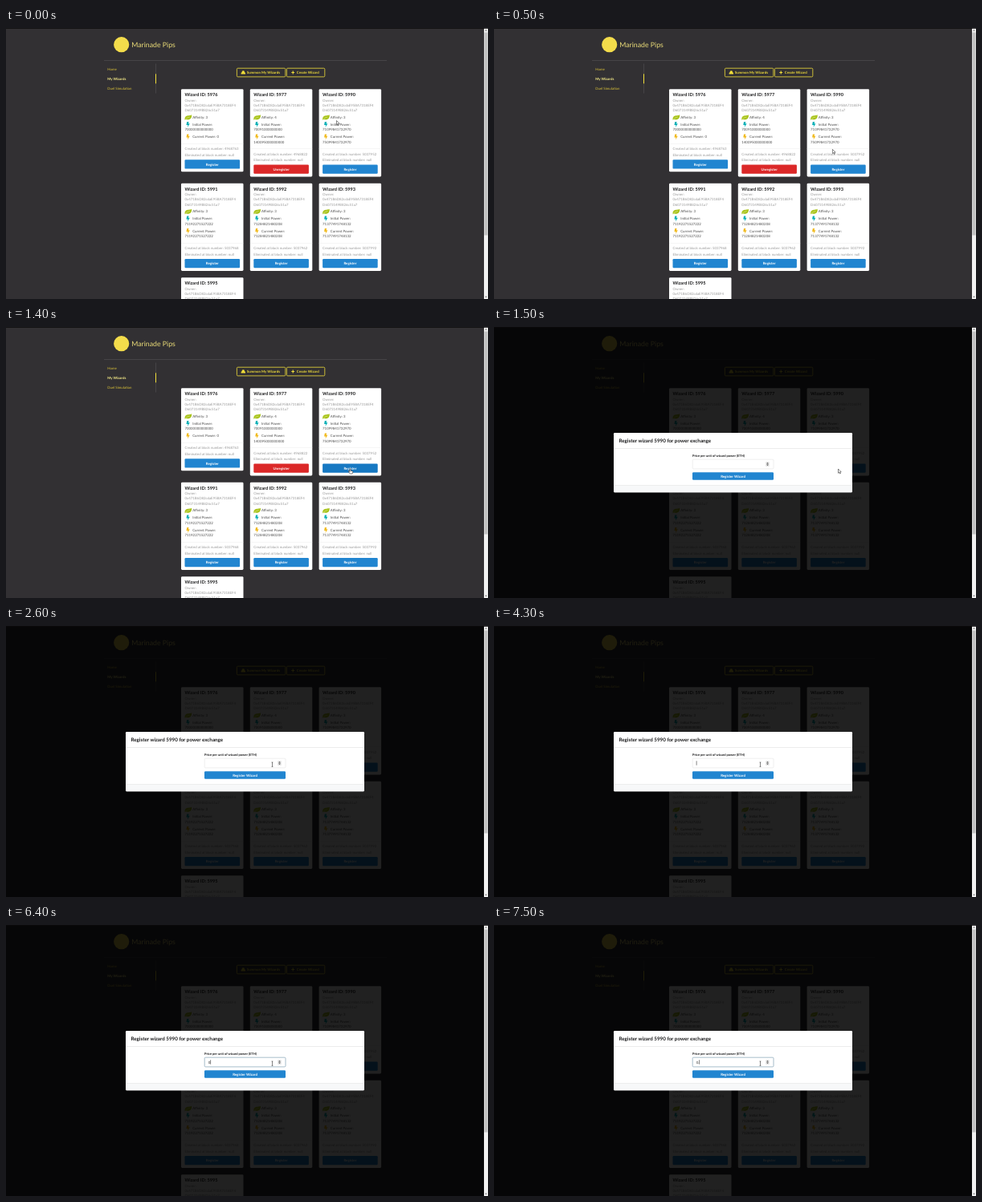
Animation of 600 by 338 pixels, one loop 8 s. Source, as an HTML page:

```html
<!DOCTYPE html>
<html lang="en">
<head>
<meta charset="utf-8">
<title>Wizard registration</title>
<style>
  html, body { margin: 0; height: 100%; overflow: hidden; background: #323033; }
  svg { display: block; width: 100vw; height: 100vh; }
  text { font-family: Lato, sans-serif; text-rendering: geometricPrecision; white-space: pre; }
</style>
</head>
<body>
<svg id="stage" viewBox="0 0 600 338"></svg>
<script>
const LOOP = 8000, STEP = 100;
const BODY = 4.375;
const BLUE = '#2185d0', BLUE_HOVER = '#1678c2', RED = '#db2828', YELLOW = '#f2df3a';
const INK = '#4a4a4a', MUTED = '#999', BLACK = '#1b1b1c';
const OWNER = ['0x471B6D82cdaE95BA7318EF4', 'D6073149B826c51a7'];

const text = (x, y, value, { size = BODY, fill = INK, weight = 400, anchor = 'start' } = {}) =>
  `<text x="${x}" y="${y}" font-size="${size}" fill="${fill}" font-weight="${weight}" text-anchor="${anchor}">${value}</text>`;

const rect = (x, y, w, h, fill, extra = '') =>
  `<rect x="${x}" y="${y}" width="${w}" height="${h}" fill="${fill}" ${extra}/>`;

const path = (d, fill, x = 0, y = 0, extra = '') =>
  `<path d="${d}" fill="${fill}" transform="translate(${x} ${y})" ${extra}/>`;

const button = (x, y, w, h, label, fill, id = '') =>
  rect(x, y, w, h, fill, `rx="1.2" ${id && `id="${id}"`}`) +
  text(x + w / 2, y + h / 2 + 1.55, label, { fill: '#fff', weight: 700, anchor: 'middle' });

const leaf = (x, y) =>
  path('M-4.2 2.6C-4.6-1-2-2.1 .6-2.2 2.4-2.3 3.4-2.7 4.2-3.2 4.9 .6 2.6 2.9-.4 2.8-1.6 2.8-2.4 2.2-3.2 2.7L-4 3.6Z', '#a9c41b', x, y) +
  path('M-3.2 2Q-1 0 2 -.4', 'none', x, y, 'stroke="#e8f0b8" stroke-width=".5"');

const bolt = (x, y, fill) =>
  path('M-1.4-3.4H1L.3-1.2H2.2L-.7 3.6-.1 .5H-2.1Z', fill, x, y);

function card(column, row, { id, affinity, initial, current, block, action = 'Register' }) {
  const x = 218 + column * 85.8, y = 76.2 + row * 117.5, left = x + 4.5;
  const inline = current === '0';
  const shift = inline ? -6.2 : 0;
  const line = (dy, value, style) => text(left, y + dy, value, style);
  const label = (dy, value) => text(x + 14.2, y + dy, value);
  const hoverId = id === 5990 ? 'hovered' : '';
  return rect(x, y, 77.5, 109.3 + shift, '#fff', 'rx="1.4"') +
    line(9.2, `Wizard ID: ${id}`, { size: 5.62, fill: BLACK, weight: 700 }) +
    line(15.3, 'Owner:', { fill: MUTED }) +
    OWNER.map((part, i) => line(21.6 + i * 6.2, part, { fill: MUTED })).join('') +
    leaf(x + 8.8, y + 35.2) + label(36.6, `Affinity: ${affinity}`) +
    bolt(x + 8.6, y + 44.2, '#00aeb5') + label(45.6, 'Initial Power:') + line(51.9, initial) +
    bolt(x + 8.6, y + 59.8, '#f0b91a') + label(61.2, 'Current Power:' + (inline ? ' 0' : '')) +
    (inline ? '' : line(67.7, current)) +
    rect(x, y + 74.4 + shift, 77.5, .35, '#e6e6e6') +
    line(82.3 + shift, `Created at block number: ${block}`, { fill: MUTED }) +
    line(90 + shift, 'Eliminated at block number: null', { fill: MUTED }) +
    button(left, y + 94.3 + shift, 68.6, 11.3, action, action === 'Register' ? BLUE : RED, hoverId);
}

const wizards = [
  { id: 5976, affinity: 3, initial: '70000000000000', current: '0', block: 4968763 },
  { id: 5977, affinity: 4, initial: '70091000000000', current: '140095000000000', block: 4968822, action: 'Unregister' },
  { id: 5990, affinity: 3, initial: '71099841732970', current: '75099841732970', block: 5037952 },
  { id: 5991, affinity: 3, initial: '71192271527222', current: '71192271527222', block: 5037968 },
  { id: 5992, affinity: 3, initial: '71284821480208', current: '71284821480208', block: 5037962 },
  { id: 5993, affinity: 3, initial: '71377491748132', current: '71377491748132', block: 5037992 },
  { id: 5995, affinity: 3, initial: '71562992817304', current: '71562992817304', block: 5038004 },
];

const outlineButton = (x, w, label, textX) =>
  rect(x, 50.2, w, 10.7, 'none', `rx="1.2" stroke="${YELLOW}" stroke-width=".8"`) +
  text(textX, 57.1, label, { fill: YELLOW, weight: 700 });

const header =
  `<circle cx="143.7" cy="20.7" r="9.6" fill="#f3dc4b"/>` +
  text(156.2, 23.6, 'Marinade Pips', { size: 8.75, fill: '#eadb78' }) +
  rect(122, 40.3, 352, .5, '#5a585b');

const sidebar =
  rect(186.3, 44.5, .5, 37, '#5a585b') + rect(186, 57.3, 1, 12, YELLOW) +
  text(126.2, 53.2, 'Home', { fill: '#dcc338' }) +
  text(126.2, 65.2, 'My Wizards', { fill: '#fbf08a', weight: 700 }) +
  text(126.2, 77.1, 'Duel Simulation', { fill: '#dcc338' });

const toolbar =
  outlineButton(287.4, 60.4, 'Summon My Wizards', 299.8) +
  path('M-2.7 1.7V.5Q-2.6-.5-1.4-.4A1.5 1.5 0 1 1 1.4-.4Q2.6-.5 2.7 .5V1.7Z', YELLOW, 295.3, 55.7) +
  outlineButton(349.4, 47.4, 'Create Wizard', 361.8) +
  path('M-1.9 0H1.9M0-1.9V1.9', 'none', 357.2, 55.5, `stroke="${YELLOW}" stroke-width="1.1"`);

const modal =
  rect(149, 132, 297, 74.2, '#fff', 'rx="1.2"') +
  text(155.4, 144, 'Register wizard 5990 for power exchange', { size: 6.25, fill: BLACK, weight: 700 }) +
  rect(149, 151.2, 297, .5, '#d8d8d9') +
  text(247, 162.3, 'Price per unit of wizard power (ETH)', { size: 4.06, fill: BLACK, weight: 700 }) +
  rect(247.2, 165.2, 100.8, 11.7, '#fff', 'rx="1.2" stroke="#dcdcdd" stroke-width=".5"') +
  rect(247.2, 165.2, 100.8, 11.7, 'none', 'id="focus" rx="1.2" stroke="#7fa3ba" stroke-width=".6"') +
  rect(338.3, 168.2, 4.4, 5.7, '#e2e2e2') +
  path('M-1.2-.5L0-2 1.2-.5ZM-1.2 .5L0 2 1.2 .5Z', '#444', 340.5, 171) +
  `<text id="entry" x="251.8" y="172.6" font-size="${BODY}" fill="#333"></text>` +
  rect(0, 168.3, .55, 5.4, '#222', 'id="caret"') +
  button(247, 181.2, 101, 9.6, 'Register Wizard', BLUE) +
  path('M149 197.2H446V205Q446 206.2 444.8 206.2H150.2Q149 206.2 149 205Z', '#f7f8f9') +
  rect(149, 197, 297, .4, '#d8d8d9');

const scrollbar =
  rect(595, 0, 5, 338, '#f1f1f1') + rect(595.4, 5.5, 4.2, 253, '#c1c1c1') +
  path('M-1.2 .6L0-.8 1.2 .6Z', '#555', 597.5, 2.8) +
  path('M-1.2-.6L0 .8 1.2-.6Z', '#555', 597.5, 335.4);

const outlined = 'stroke="#111" stroke-width=".5" stroke-linejoin="round"';
const cursors = {
  arrow: path('M0 0V5.2L1.2 4.1 2 6 2.9 5.6 2.1 3.8H3.7Z', '#fff', 0, 0, outlined),
  hand: path('M-.5 0Q.1-.6 .6 0V2.3L2.8 2.8Q3.4 3.1 3.2 4.2L2.6 6H-.3L-2 3.6Q-2-.0-.5 3.6Z', '#fff', 0, 0, outlined),
  beam: path('M-.9-2.7H.9M0-2.7V2.7M-.9 2.7H.9', 'none', 0, 0, 'stroke="#222" stroke-width=".55"'),
};

document.getElementById('stage').innerHTML =
  rect(0, 0, 600, 338, '#323033') + header + sidebar + toolbar +
  wizards.map((wizard, i) => card(i % 3, Math.floor(i / 3), wizard)).join('') +
  `<g id="dialog">${rect(0, 0, 595, 338, '#000', 'opacity=".87"')}${modal}</g>` +
  scrollbar + rect(0, 0, 600, .8, '#0c0b0c') +
  Object.entries(cursors).map(([name, shape]) => `<g id="${name}">${shape}</g>`).join('');

const el = id => document.getElementById(id);
const show = (id, visible) => el(id).setAttribute('visibility', visible ? 'visible' : 'hidden');
const progress = (t, from, to) => Math.min(1, Math.max(0, (t - from) / (to - from)));
const ease = p => p * p * (3 - 2 * p);
const mix = (a, b, p) => a + (b - a) * p;
const between = (t, from, to) => t >= from && t < to;

function draw(now) {
  const t = Math.floor(now % LOOP / STEP) * STEP;

  const toButton = ease(progress(t, 0, 900));
  const toInput = ease(progress(t, 2200, 2600));
  const x = mix(mix(411.5, 428.5, toButton), 331.5, toInput);
  const y = mix(mix(115.5, 177, toButton), 172.7, toInput);

  const open = t >= 1500;
  const overButton = !open && y > 171;
  const shape = overButton ? 'hand' : toInput === 1 ? 'beam' : 'arrow';
  for (const name in cursors) {
    show(name, name === shape);
    el(name).setAttribute('transform', `translate(${x} ${y})`);
  }
  el('hovered').setAttribute('fill', overButton ? BLUE_HOVER : BLUE);

  el('dialog').setAttribute('display', open ? 'inline' : 'none');
  el('focus').setAttribute('opacity', progress(t, 4300, 4500));
  const entry = t < 6400 ? '' : t < 6800 ? '0' : '0.';
  el('entry').textContent = entry;
  el('caret').setAttribute('x', [251.8, 254.5, 255.5][entry.length]);
  const caretOn = between(t, 4300, 4900) || between(t, 5400, 5900) || between(t, 6400, 7000) || t >= 7500;
  el('caret').setAttribute('opacity', caretOn ? 1 : 0);
}

const start = performance.now();
function tick() {
  draw(performance.now() - start);
  requestAnimationFrame(tick);
}
tick();
</script>
</body>
</html>
```
